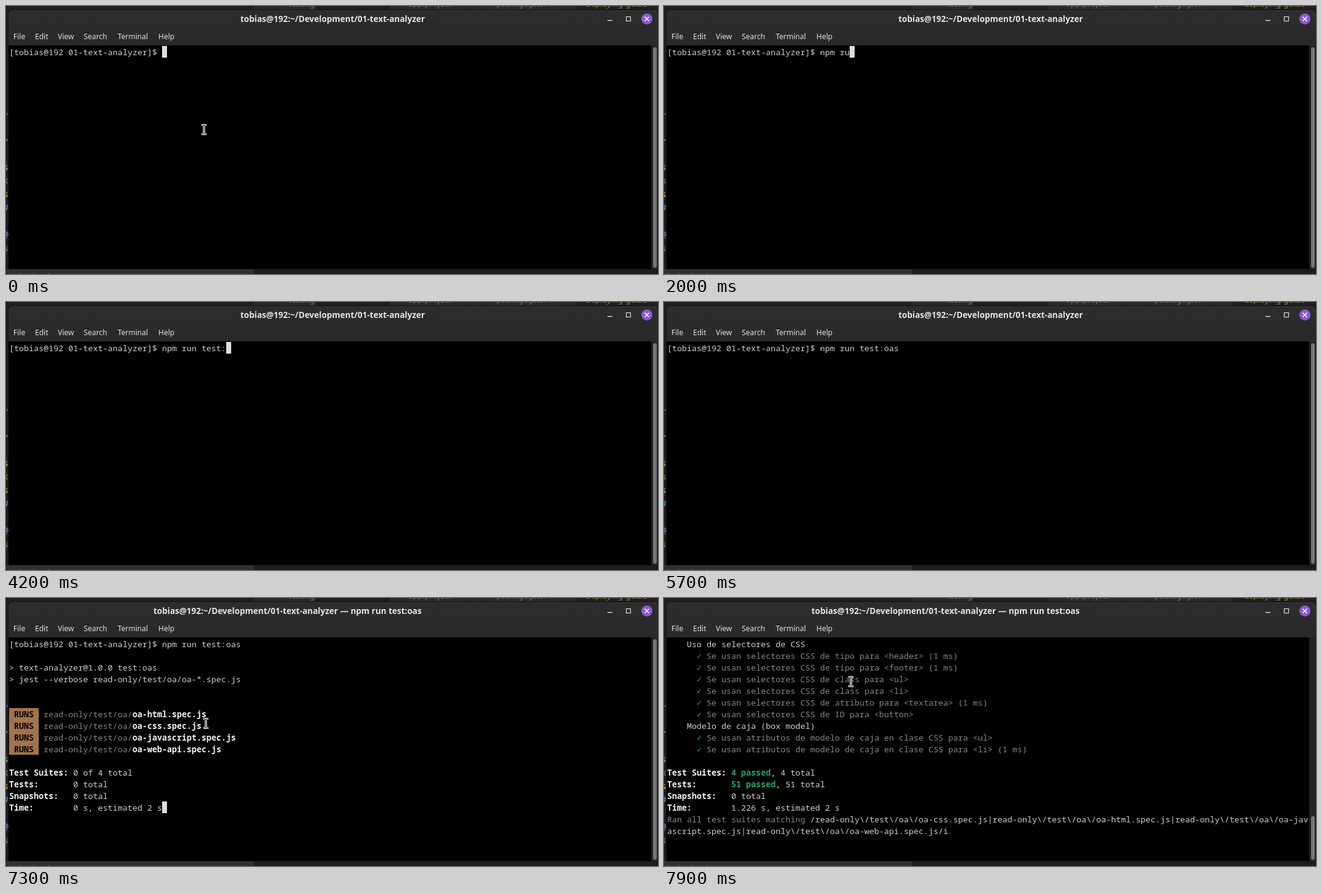
An HTML page that plays this animation: 1057x436 px, repeating every 8000 ms.

```html
<!DOCTYPE html>
<html lang="es">
<head>
<meta charset="utf-8">
<title>Terminal</title>
<style>
html, body { margin: 0; width: 100%; height: 100%; overflow: hidden; background: #1c1c1e; }
#stage { position: relative; width: 1057px; height: 436px; overflow: hidden; }
#stage div, #stage svg { position: absolute; white-space: pre; }
.tabs { left: 0; top: 0; width: 1057px; height: 8px; overflow: hidden; background: #1f1f21;
  font: 13px/16px "Noto Sans", sans-serif; color: #77777a; }
.tabs div { top: -12px; }
.gutter { left: 0; top: 8px; width: 4px; height: 420px; overflow: hidden; background: #1d1d1f;
  font: 14px/20px "Noto Sans Mono", monospace; }
.gutter div { right: 0; }
.below { left: 0; top: 428px; width: 402px; height: 8px; overflow: hidden; background: #303034;
  font: 13px/16px "Noto Sans", sans-serif; color: #aaa; }
.bar { left: 4px; top: 7px; width: 1053px; height: 57px; border-radius: 8px 8px 0 0;
  background: linear-gradient(#2d2d2d, #292929); box-shadow: inset 0 1px #383838, 0 0 0 1px #131313; }
#title { top: 11px; font: bold 13.5px/20px "Noto Sans", sans-serif; color: #e4e4e4; }
.menu { top: 40px; font: 12px/19px "Noto Sans", sans-serif; color: #dedede; }
.screen { left: 4px; top: 64px; width: 1042px; height: 364px; background: #000; }
.track { left: 1046px; top: 64px; width: 11px; height: 364px; background: #232323; }
#thumb { left: 1049px; width: 6px; border-radius: 3px; background: #747474; }
#rows { left: 5px; top: 66px; font: 13.3333px/18px "Noto Sans Mono", monospace; color: #d0cfcc;
  font-variant-ligatures: none; }
#rows b { color: #f2f2f0; }
#rows b.ok { color: #26a269; }
#rows b.run { background: #a2734c; box-shadow: 0 -1px #a2734c; color: #000; }
#rows i { font-style: normal; color: #858583; }
#rows u { display: inline-block; width: 8px; line-height: 0; text-decoration: none; color: #26a269;
  font-family: "DejaVu Sans Mono", monospace; }
#caret { width: 8px; height: 19px; background: #deddda; }
</style>
</head>
<body>
<div id="stage">
  <div class="tabs"></div>
  <div class="gutter"></div>
  <div class="below"><div style="left:6px;top:4px">index.html</div></div>
  <div class="bar"></div>
  <div id="title"></div>
  <svg width="90" height="30" style="left:967px;top:6px" fill="none" stroke="#dcdcdc">
    <path d="M8 17.5h8" stroke-width="1.4"/>
    <rect x="38.5" y="11.5" width="7" height="7" stroke-width="1.2"/>
    <circle cx="72" cy="15" r="9" fill="#8c5bd9" stroke="none"/>
    <path d="M68.5 11.5l7 7m0-7l-7 7" stroke="#fff" stroke-width="1.5"/>
  </svg>
  <div class="screen"></div>
  <div class="track"></div>
  <div id="thumb"></div>
  <div id="rows"></div>
  <div id="caret"></div>
  <svg id="mouse" width="10" height="20" fill="none" stroke-linecap="square">
    <path id="beam" d="M2.5 2.5h1.5l1 1 1-1h1.5M5 3.5v13M2.5 17.5h1.5l1-1 1 1h1.5" stroke="#fff" stroke-width="3"/>
    <use href="#beam"/>
    <path d="M2.5 2.5h1.5l1 1 1-1h1.5M5 3.5v13M2.5 17.5h1.5l1-1 1 1h1.5" stroke="#000"/>
  </svg>
</div>
<script>
const $ = id => document.getElementById(id);
const add = (parent, text, style) => {
  const el = document.createElement('div');
  el.textContent = text;
  el.style.cssText = style;
  document.querySelector(parent).append(el);
  return el;
};

// Slivers of the editor behind the window
add('.tabs', '', 'left:402px;top:0;width:100px;height:8px;background:#29292b');
add('.tabs', '', 'left:622px;top:0;width:300px;height:8px;background:#29292b');
add('.tabs', 'testing', 'left:458px');
add('.tabs', 'app.project', 'left:652px');
add('.tabs', 'package.json', 'left:795px');
add('.tabs', 'deploying-guide', 'left:940px;color:#a98a55');
[['~', 178, '#5a9bd4'], ['>', 220, '#999'], ['s', 264, '#b5bd4c'], ['x', 286, '#b8733c'],
 ['s', 308, '#c9c04a'], ['#', 330, '#4f9cb8'], ['@', 374, '#a06cc4'], ['s', 396, '#c07a45']]
  .forEach(([ch, y, color]) => add('.gutter', ch, `top:${y - 20}px;color:${color}`));
[['File', 12], ['Edit', 47], ['View', 84], ['Search', 126], ['Terminal', 181], ['Help', 247]]
  .forEach(([name, x]) => { add('#stage', name, `left:${x}px`).className = 'menu'; });

const esc = s => s.replace(/</g, '&lt;');
const bold = s => `<b>${s}</b>`;
const dim = s => `<i>${esc(s)}</i>`;
const pass = (indent, s) => ' '.repeat(indent) + '<u>✓</u> ' + dim(s);
const runs = name => `<b class="run"> RUNS </b> ${dim('read-only/test/oa/')}${bold(`oa-${name}.spec.js`)}`;
const passed = (n, rest) => `<b class="ok">${n} passed</b>, ${rest} total`;
const summary = (suites, tests, time) => [
  bold('Test Suites:') + ' ' + suites,
  bold('Tests:') + '       ' + tests,
  bold('Snapshots:') + '   0 total',
  bold('Time:') + '        ' + time + ' s, estimated 2 s'
];

const user = 'tobias@192';
const prompt = `[${user} 01-text-analyzer]$ `;
const command = 'npm run test:oas';
const place = `${user}:~/Development/01-text-analyzer`;
const keys = [400, 1100, 1400, 1600, 1800, 2000, 2300, 2700, 2900, 3200, 3500, 3700, 4200, 4500, 4800, 5200];

const started = ['', '> text-analyzer@1.0.0 test:oas', '> jest --verbose read-only/test/oa/oa-*.spec.js', '', ''];
const running = time => [...started, ...['html', 'css', 'javascript', 'web-api'].map(runs), '',
  ...summary('0 of 4 total', '0 total', time)];

const half = [
  pass(4, 'Se usa el selector del DOM getElementById'),
  '  Manejo de eventos del DOM',
  pass(4, 'Se registra un Event Listener para el evento "keyup" (1 ms)'),
  pass(4, 'Se registra un Event Listener para el evento "click"'),
  '  Manipulación dinámica del DOM',
  pass(4, 'Se actualiza el DOM al modificar el atributo "innerHTML" o "textContent"'),
  '  Módulos de ECMAScript',
  pass(4, 'Se usa "import"'),
  '', '', runs('html'), runs('css'), '',
  ...summary(passed(2, '2 of 4'), passed(13, '13'), '1')
];

const selector = s => pass(6, 'Se usan selectores CSS de ' + s);
const box = s => pass(6, 'Se usan atributos de modelo de caja en clase CSS para ' + s);
const match = '/' + ['css', 'html', 'javascript', 'web-api']
  .map(n => `read-only\\/test\\/oa\\/oa-${n}.spec.js`).join('|') + '/i';
const done = [
  '    Uso de selectores de CSS',
  selector('tipo para <header> (1 ms)'),
  selector('tipo para <footer> (1 ms)'),
  selector('class para <ul>'),
  selector('class para <li>'),
  selector('atributo para <textarea> (1 ms)'),
  selector('ID para <button>'),
  '    Modelo de caja (box model)',
  box('<ul>'),
  box('<li> (1 ms)'),
  '',
  ...summary(passed(4, '4'), passed(51, '51'), '1.226'),
  dim('Ran all test suites matching ') + match.slice(0, 101),
  match.slice(101) + dim('.')
];

function content(t) {
  if (t >= 7900) return done;
  if (t >= 7800) return half;
  const line = prompt + command.slice(0, keys.filter(k => t >= k).length);
  if (t >= 6700) return [line, ...started, '', ...running(t >= 7700 ? 1 : 0).slice(5)].filter((_, i) => i !== 6);
  return t >= 6200 ? [line, ...started] : [line];
}

// Column and row of the caret, or null while blinked off
function caretAt(t) {
  if (t >= 7700) return null;
  if (t >= 7100) return [31, 14];
  if (t >= 6500) return null;
  if (t >= 6200) return [0, 5];
  if (t >= 5900) return [0, 1];
  if (t >= 5700 || (t >= 900 && t < 1100)) return null;
  return [31 + keys.filter(k => t >= k).length, 0];
}

function mouseAt(t) {
  if (t < 300) return [321, 201];
  if (t < 7300) return null;
  const k = Math.min(3, Math.floor((t - 7300) / 100)) / 3;
  return [Math.round(324 - 21 * k), Math.round(204 - 68 * k)];
}

function move(el, pos) {
  el.style.display = pos ? '' : 'none';
  if (pos) { el.style.left = pos[0] + 'px'; el.style.top = pos[1] + 'px'; }
}

let last = -1;
function draw(t) {
  if (t === last) return;
  last = t;
  $('rows').innerHTML = content(t).map((s, i) => `<div style="top:${i * 19}px">${s}</div>`).join('');
  const busy = t >= 6100;
  $('title').textContent = busy ? `${place} — ${command}` : place;
  $('title').style.left = (busy ? 239 : 380) + 'px';
  const c = caretAt(t), m = mouseAt(t);
  move($('caret'), c && [5 + c[0] * 8, 65 + c[1] * 19]);
  move($('mouse'), m && [m[0] - 5, m[1] - 10]);
  const top = t >= 7900 ? 355 : t >= 7800 ? 267 : 67;
  $('thumb').style.top = top + 'px';
  $('thumb').style.height = 426 - top + 'px';
}

const start = performance.now();
function tick() {
  draw(Math.floor((performance.now() - start) % 8000 / 100) * 100);
  requestAnimationFrame(tick);
}
tick();
</script>
</body>
</html>
```
